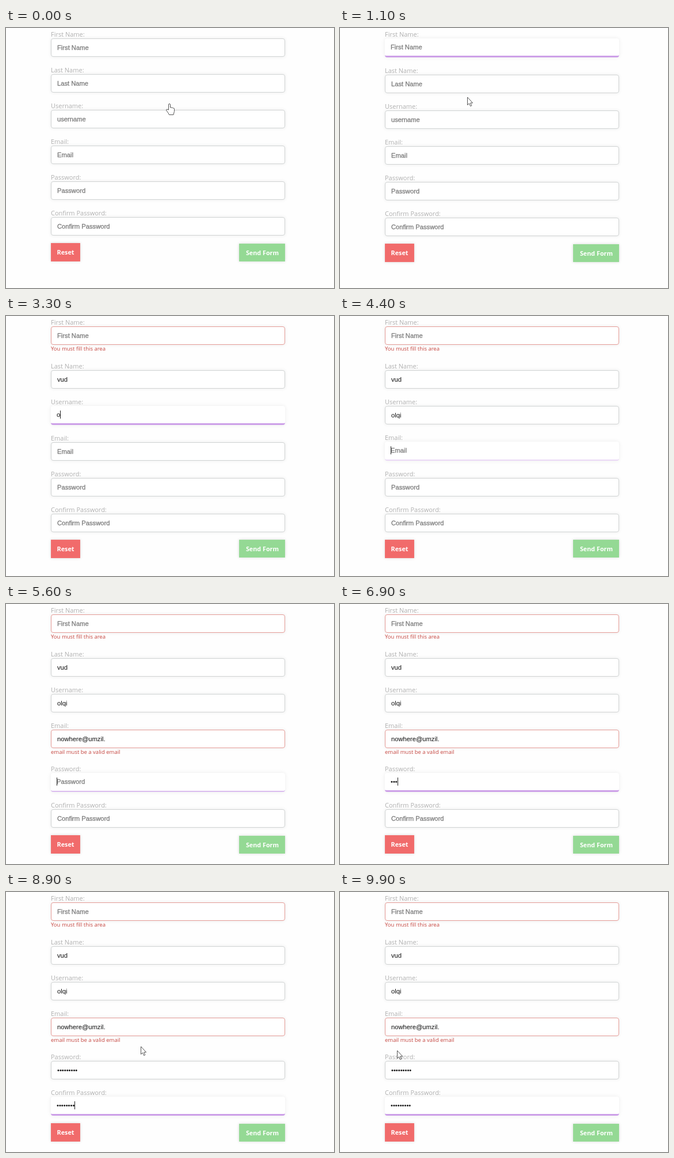
Write an HTML page that moves like this. It is 570x451 px and loops after 10 s.

```html
<!DOCTYPE html>
<html lang="en">
<head>
<meta charset="utf-8">
<title>Form validation</title>
<style>
  html, body { margin: 0; width: 100%; height: 100%; overflow: hidden; background: #fefefe; }
  #stage { position: relative; width: 570px; height: 451px; overflow: hidden; }
  #stage div { position: absolute; box-sizing: border-box; white-space: pre; }
  .label, .error { left: 78px; line-height: 12px; font-family: "Open Sans", "Noto Sans", sans-serif; }
  .label { font-size: 11px; color: #b0b0b0; }
  .error { font-size: 9.5px; color: #c4453f; }
  .box {
    left: 78px; width: 407px; height: 32px; padding-left: 10px;
    border: 1px solid #d0d3d3; border-radius: 4px; background: #fff;
    box-shadow: 0 0 6px rgba(0, 0, 0, .08);
    font: 11.2px/30px "Liberation Sans", Arial, sans-serif;
    color: #222; -webkit-text-stroke: .1px;
  }
  .box.bad { border-color: #e59c97; }
  .box.focus { border: 0 solid; box-shadow: 0 0 7px rgba(0, 0, 0, .08); }
  .hint { color: #7b7b7b; -webkit-text-stroke: .3px; }
  .caret {
    display: inline-block; width: 1px; height: 14px; margin-right: -1px;
    vertical-align: -3px; background: #222;
  }
  .button {
    color: #fff; text-align: center;
    box-shadow: 0 0 5px rgba(0, 0, 0, .14), inset 0 0 1px rgba(255, 255, 255, .5);
    font: bold 10.8px "Open Sans", "Noto Sans", sans-serif;
  }
  #reset { left: 78px; width: 51px; height: 32px; line-height: 31px; background: #f16b6b; }
  #send { left: 405px; width: 80px; height: 31px; line-height: 31px; padding-left: 1px; background: #94d994; }
  #pointer { position: absolute; inset: 0; }
  #pointer g { fill: #fff; stroke: #555; stroke-width: 1; stroke-linejoin: round; }
</style>
</head>
<body>
<div id="stage">
  <div id="reset" class="button">Reset</div>
  <div id="send" class="button">Send Form</div>
  <svg id="pointer" width="570" height="451">
    <g id="arrow"><path d="M-.5 0V13.5L2.5 10.8L4.6 15.6L6.8 14.7L4.7 10H8.6Z"/></g>
    <g id="hand"><path d="M-1.5 11V2Q-1.5 .5 0 .5T1.5 2V7Q3 6 4 7.4Q5.6 6.5 6.4 8Q8.5 7.4 8.5 9.5V13.5L7 19.5H-.5L-2 16.5L-5.3 12Q-5.8 10 -4 10Z"/></g>
    <g id="beam"><path fill="none" d="M-2.5 -7.5H2.5M0 -7.5V7.5M-2.5 7.5H2.5"/></g>
  </svg>
</div>
<script>
const LOOP = 10000, STEP = 100, FADE = 300, BLINK = 500;
const PITCH = 62, FIRST_TOP = 18, ERROR_HEIGHT = 13.5;

// Typing schedules: each pair is a time and the value from then on.
const typed = (text, times) => times.map((t, i) => [t, text.slice(0, i + 1)]);
const dots = times => typed("\u2022".repeat(times.length), times);

const fields = [
  { label: "First Name:", hint: "First Name", from: 500, to: 1200, keys: [],
    error: "You must fill this area" },
  { label: "Last Name:", hint: "Last Name", from: 1800, to: 3000,
    keys: typed("vud", [2300, 2500, 2600]) },
  { label: "Username:", hint: "username", from: 3000, to: 4300,
    keys: typed("olqi", [3300, 3400, 3600, 3800]) },
  { label: "Email:", hint: "Email", from: 4300, to: 5400,
    keys: [[4500, "nowh"], [4600, "nowhere@umzil"], [5300, "nowhere@umzil."]],
    error: "email must be a valid email" },
  { label: "Password:", hint: "Password", from: 5400, to: 8200,
    keys: dots([6500, 6700, 6900, 7100, 7200, 7400, 7500, 7600, 7700]) },
  { label: "Confirm Password:", hint: "Confirm Password", from: 8200, to: LOOP,
    keys: dots([8300, 8400, 8500, 8600, 8700, 8700, 8800, 8900, 9000]) }
];

// Pointer stops: time, x, y. It is hidden between the two trips.
const trips = [
  [[0, 284, 131], [300, 222, 36], [700, 222, 36], [1100, 222, 120], [1200, 222, 123],
   [1600, 222, 123], [1800, 200, 109], [1900, 200, 109]],
  [[7600, 235, 268], [9500, 235, 268], [9900, 100, 275], [LOOP, 100, 275]]
];

const byId = id => document.getElementById(id);
const stage = byId("stage"), pointer = byId("pointer");

function add(parent, tag, name, text = "") {
  const el = document.createElement(tag);
  el.className = name;
  el.textContent = text;
  parent.insertBefore(el, parent === stage ? pointer : null);
  return el;
}

for (const f of fields) {
  f.labelEl = add(stage, "div", "label", f.label);
  f.box = add(stage, "div", "box");
  f.valueEl = add(f.box, "span", "value");
  f.caret = add(f.box, "i", "caret");
  f.hintEl = add(f.box, "span", "hint", f.hint);
  f.errorEl = add(stage, "div", "error", f.error);
}

const show = (el, on) => { el.style.display = on ? "" : "none"; };
const place = (el, y) => { el.style.top = y + "px"; };

// Draws one field and returns how far it pushes down what follows.
function drawField(f, top, t) {
  const focus = t >= f.from && t < f.to;
  const bad = Boolean(f.error) && t >= f.to;
  const fade = focus ? Math.min(1, (t - f.from) / FADE) : 0;
  const grow = fade > 0 ? 1 : 0;
  const key = f.keys.filter(k => k[0] <= t).pop();
  const last = key ? key[0] : f.from;

  place(f.labelEl, top - 13);
  place(f.box, top);
  place(f.errorEl, top + 33);
  f.box.className = "box" + (focus ? " focus" : bad ? " bad" : "");
  f.box.style.height = 32 + grow + "px";
  f.box.style.borderBottom = focus
    ? `${fade === 1 ? 3 : 2}px solid rgba(205, 160, 232, ${.12 + .88 * fade})` : "";
  f.valueEl.textContent = key ? key[1] : "";
  show(f.hintEl, !key);
  show(f.caret, focus && Math.floor((t - last) / BLINK) % 2 === 0);
  show(f.errorEl, bad);
  return grow + (bad ? ERROR_HEIGHT : 0);
}

function pointerAt(t) {
  const trip = trips.find(p => t >= p[0][0] && t <= p[p.length - 1][0]);
  if (!trip) return null;
  const i = Math.max(1, trip.findIndex(p => p[0] >= t));
  const [a, b] = [trip[i - 1], trip[i]];
  const k = (t - a[0]) / (b[0] - a[0]);
  return [a[1] + (b[1] - a[1]) * k, a[2] + (b[2] - a[2]) * k];
}

// Labels show a hand, inputs a text beam, gaps an arrow.
function drawPointer(t) {
  const at = pointerAt(t);
  let kind = "";
  if (at) {
    const shift = fields.reduce((s, f) => s + (f.error && t >= f.to ? ERROR_HEIGHT : 0), 0);
    const row = (at[1] - shift - 5 + PITCH) % PITCH;
    kind = row < 13 ? "hand" : row < 45 ? "beam" : "arrow";
  }
  for (const id of ["arrow", "hand", "beam"]) {
    show(byId(id), id === kind);
    if (id === kind) byId(id).setAttribute("transform", `translate(${at[0]} ${at[1]})`);
  }
}

function draw(time) {
  const t = Math.floor((time % LOOP) / STEP) * STEP;
  let shift = 0;
  fields.forEach((f, i) => { shift += drawField(f, FIRST_TOP + i * PITCH + shift, t); });
  place(byId("reset"), 373 + shift);
  place(byId("send"), 373.5 + shift);
  drawPointer(t);
}

let start;
function tick(now) {
  start ??= now;
  draw(now - start);
  requestAnimationFrame(tick);
}
draw(0);
requestAnimationFrame(tick);
</script>
</body>
</html>
```
